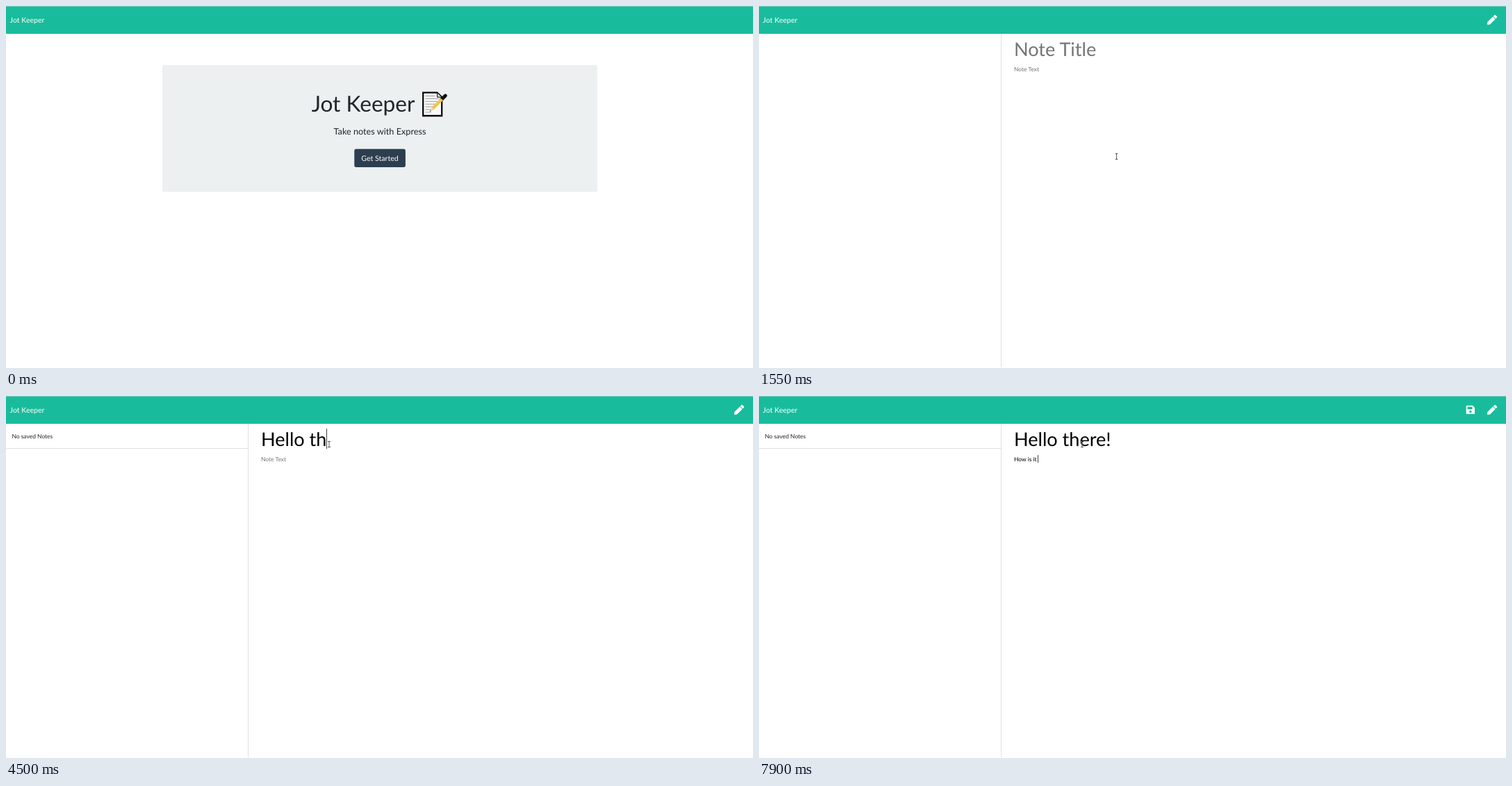
Recreate the animation shown at these times as an HTML page with a canvas. Size 1075 by 521 pixels, loop 8000 ms.

```html
<!DOCTYPE html>
<html lang="en">
<head>
<meta charset="utf-8">
<title>Notes demo</title>
<style>
  html, body { margin: 0; width: 100%; height: 100%; overflow: hidden; background: #fff; }
  canvas { display: block; width: 1075px; height: 521px; text-rendering: geometricPrecision; }
</style>
</head>
<body>
<canvas id="stage"></canvas>
<script>
const W = 1075, H = 521, LOOP = 8000;
const ZOOM = 0.5643; // page pixels to stage pixels
const APP = 'Jot Keeper';
const FONT = 'Lato, "Open Sans", sans-serif';

const canvas = document.getElementById('stage');
const ctx = canvas.getContext('2d');
const dpr = window.devicePixelRatio || 1;
canvas.width = W * dpr;
canvas.height = H * dpr;

const title = {
  text: 'Hello there!', hint: 'Note Title', size: 48, base: 71.6, top: 47, height: 29,
  keys: [3440, 3580, 3810, 3890, 4040, 4270, 4430, 4500, 4670, 4750, 4830, 5380],
  focus: [[2490, 3030], [3440, 5760]]
};
const body = {
  text: 'How is it ', hint: 'Note Text', size: 15, base: 93.5, top: 85, height: 11,
  keys: [6390, 6630, 6870, 7030, 7260, 7410, 7510, 7650, 7830, 7900],
  focus: [[5760, 6310], [6390, LOOP]]
};

const penIcon = new Path2D('M290.7 93.2l128 128-278 278-114.1 12.6C11.3 513.5-1.6 500.6.1 485.3l12.7-114.2z' +
  'M497.9 74.2l-60.1-60.1c-18.8-18.8-49.2-18.8-67.9 0l-56.6 56.5 128 128 56.6-56.5c18.7-18.8 18.7-49.2 0-67.9z');
const saveIcon = new Path2D('M434 130L350 46A48 48 0 0 0 316 32H48a48 48 0 0 0-48 48v352a48 48 0 0 0 48 48' +
  'h352a48 48 0 0 0 48-48V164a48 48 0 0 0-14-34zM224 416a64 64 0 1 1 0-128 64 64 0 0 1 0 128z' +
  'M320 111V212a12 12 0 0 1-12 12H76a12 12 0 0 1-12-12V108a12 12 0 0 1 12-12h228a16 16 0 0 1 16 15z');

const clamp = v => Math.min(1, Math.max(0, v));
const mix = (a, b, u) => a + (b - a) * u;
const easeOut = u => 1 - (1 - u) ** 2;
const easeInOut = u => (1 - Math.cos(Math.PI * u)) / 2;

const stepped = (t, from, to, steps) =>
  t < from ? 0 : clamp((Math.floor((t - from) / (to - from) * (steps - 1)) + 1) / steps);

function setFont(px) {
  ctx.font = `400 ${px * ZOOM}px ${FONT}`;
  ctx.textRendering = 'geometricPrecision';
}

function write(text, x, y, px, color, align = 'left') {
  setFont(px);
  ctx.textAlign = align;
  ctx.fillStyle = color;
  ctx.fillText(text, x, y);
}

function rect(x, y, w, h, color) {
  ctx.fillStyle = color;
  ctx.fillRect(x, y, w, h);
}

function box(x, y, w, h, r, color, alpha = 1) {
  ctx.globalAlpha = alpha;
  ctx.fillStyle = color;
  ctx.beginPath();
  ctx.roundRect(x, y, w, h, r);
  ctx.fill();
  ctx.globalAlpha = 1;
}

function poly(points, fill, stroke, width) {
  ctx.beginPath();
  points.forEach(([x, y]) => ctx.lineTo(x, y));
  ctx.closePath();
  if (fill) { ctx.fillStyle = fill; ctx.fill(); }
  if (stroke) { ctx.strokeStyle = stroke; ctx.lineWidth = width; ctx.stroke(); }
}

function line(x1, y1, x2, y2, color, width, cap = 'butt') {
  ctx.strokeStyle = color;
  ctx.lineWidth = width;
  ctx.lineCap = cap;
  ctx.beginPath();
  ctx.moveTo(x1, y1);
  ctx.lineTo(x2, y2);
  ctx.stroke();
}

function icon(path, x, y) {
  ctx.save();
  ctx.translate(x, y);
  ctx.scale(14.1 / 512, 14.1 / 512);
  ctx.fillStyle = '#fff';
  ctx.fill(path, 'evenodd');
  ctx.restore();
}

function memo() {
  poly([[600.2, 124.6], [620.5, 124.6], [627.2, 131.2], [627.2, 158], [600.2, 158]], '#fafafa', '#0a0a0a', 2.3);
  poly([[620.5, 124.6], [620.5, 131.2], [627.2, 131.2]], '#d8d8d8', '#0a0a0a', 1);
  for (let i = 0; i < 7; i++) {
    const y = 129.5 + i * 3.9;
    line(603.3, y, i < 1 ? 617 : i < 4 ? 623 : 618 - (i - 4) * 3, y, '#9b9b9b', 1);
  }
  line(626.5, 134.8, 632.3, 129.1, '#111', 5, 'round');
  line(614.2, 147.4, 627.3, 134.2, '#f6c445', 4.4);
  poly([[612.6, 145.8], [615.8, 149], [609.8, 151.9]], '#f1d6a6');
  poly([[610.6, 150], [611.8, 151.1], [609.8, 151.9]], '#333');
}

function arrow(x, y) {
  poly([[x + .4, y + .6], [x + .4, y + 8.8], [x + 2.2, y + 7.2], [x + 3.5, y + 10.2],
        [x + 4.8, y + 9.6], [x + 3.6, y + 6.7], [x + 6.2, y + 6.5]], '#fff', '#111', .7);
}

function hand(x, y) {
  poly([[x - .8, y + .4], [x + .8, y + .4], [x + 1, y + 3.8], [x + 5, y + 4.8], [x + 5.6, y + 6],
        [x + 5, y + 9.4], [x + 4.2, y + 12], [x - .6, y + 12], [x - 3, y + 7.6], [x - 2.6, y + 6.2],
        [x - .9, y + 7.6]], '#fff', '#111', .7);
}

function beam(x, y) {
  ctx.globalCompositeOperation = 'difference';
  rect(x - .5, y - 4, 1, 8, '#a0a0a0');
  rect(x - 2, y - 4.5, 4, 1, '#909090');
  rect(x - 2, y + 3.5, 4, 1, '#909090');
  ctx.globalCompositeOperation = 'source-over';
}

function navbar() {
  rect(0, 0, W, 40, '#18bc9c');
  rect(0, 0, W, 1, '#74c9b6');
  write(APP, 5.6, 24, 18.75, '#fff');
}

function welcome(t) {
  box(225, 85, 626, 182.6, 2.7, '#ecf0f1');
  write(APP, 588.5, 152.2, 56, '#212529', 'right');
  memo();
  write('Take notes with Express', 538, 185, 22.5, '#212529', 'center');

  const u = easeOut(stepped(t, 70, 780, 10));
  const nudge = stepped(t, 940, 1020, 2);
  const x = mix(mix(1013, 507.5, u), 514, nudge);
  const y = mix(mix(500, 213, u), 217, nudge);
  const over = t >= 70 && x < 575 && y < 232;

  const press = clamp((t - 1180) / 220);
  if (press > 0) {
    const grow = 1.8 * press;
    box(501.3 - grow, 205.8 - grow, 73.6 + 2 * grow, 26.2 + 2 * grow, 2.7 + grow, '#4c5b6a', .6 * press);
  }
  box(501.3, 205.8, 73.6, 26.2, 2.7, '#2c3e50');
  box(501.3, 205.8, 73.6, 26.2, 2.7, '#1e2b37', clamp((t - 590) / 150));
  box(501.3, 205.8, 73.6, 26.2, 2.7, '#1a252f', press);
  write('Get Started', 538, 223, 18.75, '#fff', 'center');

  if (over && t < 1480) hand(x, y);
  else if (t >= 1480) arrow(513.4, 216);
  else if (t >= 70) arrow(x, y);
}

function field(f, t) {
  const typed = f.text.slice(0, f.keys.filter(k => t >= k).length);
  write(typed || f.hint, 367, f.base, f.size, typed ? '#000' : '#757575');
  if (f.focus.some(([on, off]) => t >= on && t < off)) {
    const x = Math.floor(367 + ctx.measureText(typed).width);
    rect(x, f.top, 1, f.height, '#444');
  }
}

function editor(t) {
  rect(348, 40, 1, 480, '#e0e0e0');
  if (t >= 1630) {
    write('No saved Notes', 8.4, 61, 15, '#212529');
    rect(0, 75, 348, 1, '#e0e0e0');
  }
  icon(penIcon, 1048, 12.8);
  if (t >= 6560) icon(saveIcon, 1017.7, 12.8);
  field(title, t);
  field(body, t);
  const u = easeInOut(stepped(t, 1860, 2490, 9));
  beam(mix(514.5, 465, u), mix(216.5, 69.5, u));
}

function draw(t) {
  ctx.setTransform(dpr, 0, 0, dpr, 0, 0);
  rect(0, 0, W, H, '#fff');
  navbar();
  if (t < 1550) welcome(t);
  else editor(t);
}

const start = performance.now();
function tick() {
  draw((performance.now() - start) % LOOP);
  requestAnimationFrame(tick);
}
tick();
</script>
</body>
</html>
```
